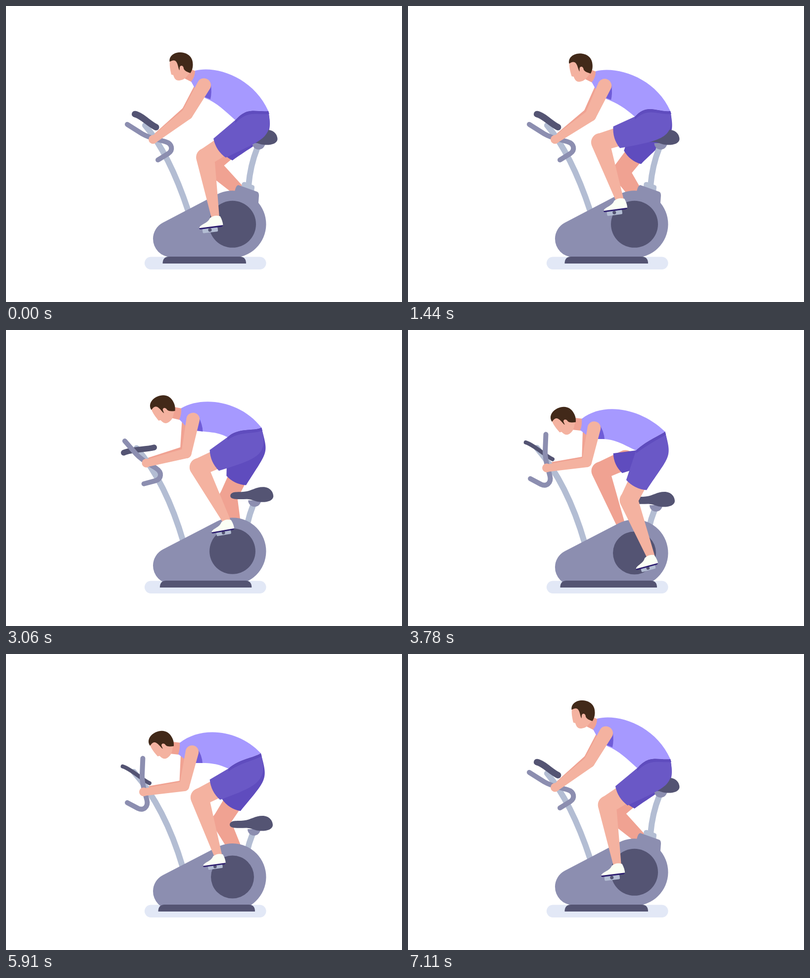
These frames come from a looping animation (800x600 px, 7.14 s). An HTML page with a canvas:

```html
<!DOCTYPE html>
<html>
<head>
<meta charset="utf-8">
<style>
html, body { margin: 0; width: 100%; height: 100%; overflow: hidden; background: #fff; }
canvas { display: block; }
</style>
</head>
<body>
<canvas id="stage" width="800" height="600"></canvas>
<script>
const ctx = document.getElementById('stage').getContext('2d');
const LOOP = 7140, END = 7110, TAU = Math.PI * 2, DEG = Math.PI / 180;
const DARK = '#545473', GREY = '#8c8eb0', STEEL = '#b3bdd3';
const SKIN = '#f4b2a0', SHADE = '#f0a292', SHIRT = '#a699ff', SHORTS = '#6a58c6', DEEP = '#5f4cbe';

// time in ms, pedal revolutions since the start
const PEDAL = [[0, 0], [2450, 6.596], [3060, 7.783], [3400, 8.336], [END, 18]];

const mix = (a, b, k) => a + (b - a) * k;
const smooth = (t, a, b) => { const p = Math.min(1, Math.max(0, (t - a) / (b - a))); return p * p * (3 - 2 * p); };
const add = (p, x, y) => [p[0] + x, p[1] + y];

function turns(t) {
  const i = PEDAL.findIndex(p => p[0] >= t);
  if (i < 1) return 0;
  const [a, ra] = PEDAL[i - 1], [b, rb] = PEDAL[i];
  return mix(ra, rb, (t - a) / (b - a));
}

function shape(color, d) {
  ctx.fillStyle = color;
  ctx.fill(new Path2D(d));
}
function line(color, width, d) {
  ctx.strokeStyle = color;
  ctx.lineWidth = width;
  ctx.lineCap = ctx.lineJoin = 'round';
  ctx.stroke(new Path2D(d));
}
function disc(color, x, y, r) {
  ctx.fillStyle = color;
  ctx.beginPath();
  ctx.arc(x, y, r, 0, TAU);
  ctx.fill();
}
// convex hull of two circles
function taper(color, [x1, y1], r1, [x2, y2], r2) {
  const a = Math.atan2(y2 - y1, x2 - x1), b = Math.acos((r1 - r2) / Math.hypot(x2 - x1, y2 - y1));
  ctx.fillStyle = color;
  ctx.beginPath();
  ctx.arc(x1, y1, r1, a + b, a - b + TAU);
  ctx.arc(x2, y2, r2, a - b, a + b);
  ctx.fill();
}
function placed(x, y, deg, draw) {
  ctx.save();
  ctx.translate(x, y);
  ctx.rotate(deg * DEG);
  draw();
  ctx.restore();
}

function kneeOf(hip, ankle) {
  const thigh = 123, shin = 123;
  const dx = ankle[0] - hip[0], dy = ankle[1] - hip[1], d = Math.min(Math.hypot(dx, dy), thigh + shin);
  const along = (thigh * thigh - shin * shin + d * d) / (2 * d);
  const out = Math.sqrt(Math.max(0, thigh * thigh - along * along));
  return [hip[0] + (dx * along - dy * out) / d, hip[1] + (dy * along + dx * out) / d];
}
function leg(hip, knee, ankle, color) {
  const thigh = [mix(knee[0], hip[0], .45), mix(knee[1], hip[1], .45)];
  taper(color, thigh, 19.5, knee, 18);
  taper(color, knee, 18.5, ankle, 8);
}
// waistband is the curve from the front of the waist to its back
function shorts(hip, knee, front, waistband, back, round, color, reach, half) {
  const len = Math.hypot(hip[0] - knee[0], hip[1] - knee[1]);
  const ux = (hip[0] - knee[0]) / len, uy = (hip[1] - knee[1]) / len;
  const mid = [mix(hip[0], knee[0], reach), mix(hip[1], knee[1], reach)];
  const top = add(mid, uy * half, -ux * half), low = add(mid, -uy * half, ux * half);
  const bulge = add(mid, -ux * 9, -uy * 9);
  const seat = add(low, ux * 85 - uy * 10, uy * 85 + ux * 10);
  shape(color, `M${top} L${front} ${waistband} C${add(back, round, 55)} ${seat} ${low} Q${bulge} ${top}Z`);
}

function draw(now) {
  const t = Math.min(now % LOOP, END);
  const stand = (a, b, c, d) => smooth(t, a, b) - smooth(t, c, d);
  const kx = stand(2600, 3220, 6400, 7000), ky = stand(2650, 3350, 6380, 7050);
  const ks = stand(2750, 3150, 6420, 6980), kr = stand(2880, 3400, 6400, 6950);
  const P = (ax, ay, bx, by) => [mix(ax, bx, kx), mix(ay, by, ky)];

  const angle = 166.6 * DEG - turns(t) * TAU;
  const sin = Math.sin(angle), cos = Math.cos(angle);
  const bob = (1 - Math.cos(2 * (angle - 167 * DEG))) / 2 * (1 - ky);
  const lift = t > 2400 && t < 2850 ? 9 * Math.sin((t - 2400) / 450 * Math.PI) ** 2 : 0;
  const hop = 36 * ky * (1 - ky);
  const sway = -6 * Math.cos(angle - 140 * DEG) * ks;
  const U = (...p) => add(P(...p), -6 * bob, 2.5 * bob - lift * .6 - hop * .5);

  ctx.fillStyle = '#fff';
  ctx.fillRect(0, 0, 800, 600);
  ctx.fillStyle = '#e2e8f6';
  ctx.beginPath();
  ctx.roundRect(280, 508.5, 245.5, 25.5, 12.7);
  ctx.fill();

  // joints
  const hub = [457.5, mix(442.3, 452, ky)], crank = mix(47, 41, ks);
  const pedal = add(hub, cos * crank, sin * crank);
  const ankleAt = s => add(hub, s * cos * crank + mix(11, 6, ks), s * sin * crank + mix(-26, -23, ks));
  const hip = add(P(506, 240, 501, 235), 0, -hop);
  const ankle = ankleAt(1), knee = kneeOf(hip, ankle);
  const farAnkle = add(ankleAt(-.92), -6, 0), farKnee = kneeOf(hip, farAnkle);
  const waist = add(P(461.5, 229, 454, 237), mix(6.7, 9, kx) * sin, 9.4 * sin - hop);
  const back = add(P(530, 213, 516.5, 203), 3.6 * sin * kx, 4 * sin * ky - hop * .8);
  const h1 = add(back, mix(-28, -13, kx), mix(2, 9, kx)), h2 = add(waist, mix(25, 20, kx), mix(-28, -19, kx));
  const band = `C${h2} ${h1} ${back}`, round = mix(10, 15, kx);
  const hand = [mix(298, 281, ks) + sway, mix(271, 280, kr) - hop * .4];

  // far limbs
  const farElbow = add(U(364, 213, 358, 263), sway * .4 + 5 * bob, 6 * bob);
  taper(SHADE, U(390, 165, 363, 205), 10, farElbow, mix(9, 7, kx));
  taper(SHADE, farElbow, mix(9, 7, kx), add(hand, 3, -5), 6);
  leg(hip, farKnee, farAnkle, SHADE);
  shorts(hip, farKnee, waist, band, back, round, DEEP, .69, 22);

  // saddle and its post
  placed(mix(9.5, 0, ks), mix(-77, 0, ks), 0, () => {
    shape(STEEL, 'M466 447 L467 437 Q469 433 474 434 L489 440 Q493 441 492.500 445 L491 458Z');
    line(STEEL, 12, 'M480.500 441 Q484 400 498 365');
    shape(GREY, 'M452 455 Q455 440 460 440 L498 453.500 Q501.500 455 501.500 461 L500 482 L453 482Z');
    shape(GREY, 'M488 355 A13 13 0 0 0 514 355Z');
    shape(DARK, 'M452 346 C453 336 466 339 480 337.500 C495 336 503 328 518 328 C532 328 539 338 539 347 C538 356 527 359 514 358.500 C502 358 497 353 486 352.500 C468 353 452 354 452 346Z');
  });

  // front post, console, handlebar
  const top = [mix(281, 260, ks) + sway, mix(242, 239, ks)];
  const bend = [mix(330, 322, ks) + sway * .4, mix(300, 311, ks)];
  const foot = [mix(368, 357, ks), mix(415, 432, ks)];
  line(STEEL, 12, `M${top} Q${bend} ${foot}`);
  const tilt = 33 - 45 * 4 * ky * (1 - ky);
  placed(mix(282, 265, ks) + sway, mix(232, 244.5, ks), tilt, () => {
    const w = mix(13, 8, kr), e = mix(25, 32, ks);
    line(DARK, w, `M${-e} 1 C${-e * .5} -4 ${e * .4} 2 ${e} 0`);
  });
  placed(mix(298, 278, ks) + sway, mix(271, 273, kr) - hop * .2, 60 * kr, () =>
    line(GREY, 10, 'M-53 -31 L-23 -12 C-8 -3 7 -1 24 4 C38 8 40 21 30 28 L9 41'));

  // machine body
  const tail = [334, mix(472, 481, ky)];
  taper(GREY, hub, 68, tail, 37);
  disc(DARK, ...hub, mix(47.5, 43.5, kr));
  const bl = mix(316.5, 307.5, ky), br = mix(485, 503, ky);
  ctx.fillStyle = '#e2e8f6';
  ctx.fillRect(296, 522, 214, 4);
  shape(DARK, `M${bl} 522 Q${bl} 508 ${bl + 13} 508 H${br - 13} Q${br} 508 ${br} 522Z`);

  // near leg
  const tip = -12 - 5 * cos;
  const size = mix(1, .95, ks);
  placed(...pedal, tip, () => {
    ctx.scale(size, size);
    ctx.fillStyle = STEEL;
    ctx.beginPath();
    ctx.roundRect(-15, -4, 31, 9, 2);
    ctx.fill();
    disc(DARK, 0, 0, 3.5);
  });
  leg(hip, knee, ankle, SKIN);
  placed(...pedal, tip, () => {
    ctx.scale(size, size);
    ctx.translate(-4 * ks, 1.5 * ks);
    shape('#2e1f70', 'M-21 -7 L27 -7 Q27 -3.500 23 -3.500 L-18 -3.500 Q-22 -4 -21 -7Z');
    shape('#fbfff5', 'M-21 -6.500 C-18 -14 -3 -13 3 -24 Q13 -30 24 -25 Q28 -15 27.500 -6.500Z');
  });
  shorts(hip, knee, waist, band, back, round, SHORTS, .72, 23);

  // torso
  const hem = `C${h1} ${h2} ${waist}`;
  shape(DEEP, `M${back} ${hem} L${add(waist, 0, 6)} C${add(h2, 2, 8)} ${add(h1, 0, 6)} ${add(back, 2, 6)}Z`);
  shape(SHADE, `M${U(361, 147, 331, 202)} L${U(375, 154, 349, 204)} L${U(386, 133, 354, 180)} L${U(373, 128, 336, 178)}Z`);
  const arm = U(403, 187, 394, 221), collar = U(382, 131, 351, 180);
  const c1 = U(425, 120, 395, 145), c2 = add(P(500, 145, 470, 155 + 4 * sin), 0, -hop * .6);
  const belly = add(waist, -19, mix(-17, -8, kx));
  shape(SHIRT, `M${collar} C${c1} ${c2} ${back} ${hem} C${belly} ${U(425, 195, 420, 221)} ${arm} L${U(385, 173, 362, 214)} L${U(374, 153, 348, 203)} Q${U(382, 144, 352, 193)} ${collar}Z`);
  shape('#6f5cd8', `M${U(414, 160, 387, 192)} Q${U(416, 176, 396, 206)} ${U(413, 189, 397, 221)} L${U(400, 184, 382, 221)}Z`);

  // near arm
  const elbow = add(P(366, 219, 361, 268), 6 * bob + sway * .4, 7 * bob - lift * .3 - hop * .3);
  taper(SKIN, U(400, 160.5, 376, 198.500), mix(14, 13.3, kx), elbow, mix(11.5, 10, kx));
  taper(SKIN, elbow, mix(11.5, 10, kx), hand, 7.5);
  disc(SKIN, hand[0] - 1, hand[1] - .5, 9);

  // head, placed by the hairline
  const brow = add(P(331, 112, 291, 185), -11 * bob, 8 * bob - lift);
  placed(...brow, -28 * kx - 8 * bob, () => {
    shape(SKIN, 'M0 0 C-1 10 1 18 3 27 L7 28 C9 35 12 39.500 19 39 C26 38 29 36 33 32 L41 23 L40 -8 L12 -10Z');
    shape('#422919', 'M-.500 1 C-2 -11 9 -18.500 22 -18 C38 -17 47 -7 46.500 7 C46.500 15 44 20 41.500 24 C36 22 30 20 28 15 C28 8 21 7 20 12 L19.500 18.500 C17 15 17 7 13 1 C9 -4 4 -1 -.500 1Z');
  });
}

function frame() {
  draw(performance.now());
  requestAnimationFrame(frame);
}
frame();
</script>
</body>
</html>
```
